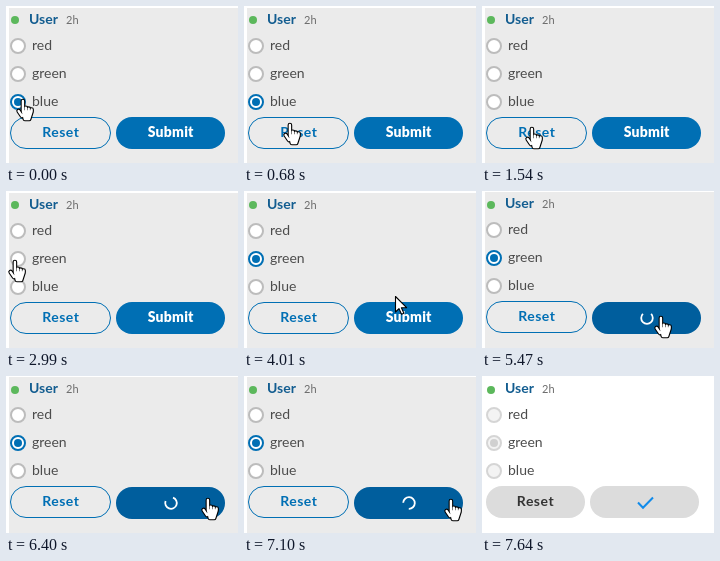
Animation of 232 by 157 pixels, one loop 8090 ms. Source, as an HTML page with a canvas:

```html
<!DOCTYPE html>
<html lang="en">
<head>
<meta charset="utf-8">
<title>Choice form</title>
<style>
  html, body { margin: 0; width: 100%; height: 100%; overflow: hidden; background: #fff; }
  canvas { display: block; width: 232px; height: 157px; }
</style>
</head>
<body>
<canvas id="stage"></canvas>
<script>
const W = 232, H = 157, LOOP = 8090;
const CLEAR = 1540, PICK = 3410, SEND = 4590, DONE = 7200, LEAVE = 7620;
const BLUE = '#006fb4', DARK_BLUE = '#005e9d';

const canvas = document.getElementById('stage');
const ctx = canvas.getContext('2d');
const ratio = window.devicePixelRatio || 1;
canvas.width = W * ratio;
canvas.height = H * ratio;

const options = ['red', 'green', 'blue'];
const optionY = i => 40 + 28 * i;

// Pointer moves; bend lifts the middle of the way
const home = { x: 17, y: 92 };
const moves = [
  { from: 190, to: 950, x: 50, y: 120, bend: 0 },
  { from: 2370, to: 2940, x: 10, y: 62, bend: 0 },
  { from: 2940, to: 3060, x: 8, y: 71, bend: 0 },
  { from: 3570, to: 4350, x: 184, y: 122, bend: 8 },
  { from: SEND, to: 5380, x: 179, y: 124, bend: 0 },
  { from: 5480, to: 6400, x: 202, y: 121, bend: 0 },
  { from: 6400, to: 7020, x: 207, y: 122, bend: 0 },
  { from: DONE, to: LEAVE, x: 214, y: 160, bend: 0 }
];

function pointerAt(t) {
  let { x, y } = home;
  for (const move of moves) {
    if (t < move.from) break;
    const u = Math.min(1, (t - move.from) / (move.to - move.from));
    const ease = 1 - (1 - u) ** 2;
    x += (move.x - x) * ease;
    y += (move.y - y) * ease - move.bend * Math.sin(Math.PI * u);
  }
  return [x, y];
}

// Centre lines of the hand: palm, thumb and four fingers
const hand = new Path2D('M7 13.5H15.6L13.2 21H8.8ZM2.6 13L6 18');
for (let i = 0; i < 4; i++) {
  const x = 6.9 + 2.9 * i;
  hand.moveTo(x, i ? 8.8 + .9 * i : 3);
  hand.lineTo(x, 13);
}
const arrow = new Path2D('M.5 .5V16L4 12.6L6.5 18.3L8.9 17.3L6.4 11.7H11.6Z');

function text(str, x, y, font, color, align = 'left', spacing = 0) {
  ctx.font = `${font} Lato, sans-serif`;
  ctx.letterSpacing = spacing + 'px';
  ctx.textAlign = align;
  ctx.fillStyle = color;
  ctx.fillText(str, x, y);
}

function outline(color, width, shape) {
  ctx.strokeStyle = color;
  ctx.lineWidth = width;
  if (shape) ctx.stroke(shape); else ctx.stroke();
}

function disc(x, y, r, fill, ring) {
  ctx.beginPath();
  ctx.arc(x, y, r, 0, 7);
  ctx.fillStyle = fill;
  ctx.fill();
  if (ring) outline(ring, 2);
}

function pill(x, y, w, h, fill, border) {
  ctx.beginPath();
  ctx.roundRect(x, y, w, h, h / 2);
  ctx.fillStyle = fill;
  ctx.fill();
  if (border) outline(border, 1);
}

function radio(y, selected, disabled) {
  const ring = disabled ? '#d5d5d5' : selected ? BLUE : '#bcbcbc';
  disc(12, y, 7, disabled ? '#f3f3f3' : '#fff', ring);
  if (selected) disc(12, y, 4, disabled ? '#d0d0d0' : BLUE);
}

function spinner(t) {
  const gap = -Math.PI / 2 + (t - 5470) / 1000 * Math.PI * 2;
  ctx.beginPath();
  ctx.arc(165, 127, 5.8, gap + Math.PI / 4, gap + Math.PI * 1.75);
  outline('#fff', 1.8);
}

function checkMark() {
  ctx.beginPath();
  ctx.moveTo(156, 126.5);
  ctx.lineTo(161, 131.8);
  ctx.lineTo(171, 121.5);
  outline('#118bea', 2);
}

function resetButton(top, done) {
  if (done) pill(4, top, 99, 32, '#dcdcdc');
  else pill(4.5, top + .5, 100, 31, 'transparent', BLUE);
  text('Reset', done ? 53.5 : 54.8, top + 20, 'bold 14px', done ? '#343434' : BLUE, 'center', .5);
}

function submitButton(t, hover) {
  if (t >= DONE) {
    pill(108, 110, 109, 32, '#dcdcdc');
    checkMark();
    return;
  }
  const sending = t >= SEND;
  pill(110, 111, 109, 32, sending || hover ? DARK_BLUE : BLUE);
  if (sending) spinner(t);
  else text('Submit', 164.7, 131, '900 14px', '#fff', 'center', .2);
}

function pointer(x, y, overControl) {
  ctx.save();
  ctx.lineCap = ctx.lineJoin = 'round';
  ctx.translate(Math.round(x), Math.round(y));
  ctx.fillStyle = '#fff';
  if (overControl) {
    ctx.translate(-7, 0);
    outline('#000', 4.6, hand);
    outline('#fff', 2.4, hand);
    ctx.fill(hand);
  } else {
    ctx.fill(arrow);
    outline('#000', 1.1, arrow);
  }
  ctx.restore();
}

function draw(t) {
  const done = t >= DONE, shift = t >= SEND ? -1 : 0;
  const choice = t < CLEAR ? 'blue' : t < PICK ? '' : 'green';
  const [px, py] = pointerAt(t);
  const inRow = py >= 111 && py <= 143;
  const onReset = inRow && px >= 4 && px <= 105;
  const onSubmit = inRow && px >= 110 && px <= 219;
  const onOption = px < 62 && options.some((_, i) => Math.abs(py - optionY(i)) < 9);

  ctx.setTransform(ratio, 0, 0, ratio, 0, 0);
  ctx.fillStyle = '#fff';
  ctx.fillRect(0, 0, W, H);
  if (t < LEAVE) {
    ctx.fillStyle = '#ebebeb';
    ctx.fillRect(3, 2 + shift, W, H);
  }

  disc(9, 14, 4, '#5cb85c');
  text('User', 23, 18 + shift, 'bold 14px', '#135d90');
  text('2h', 60, 18 + shift, '11px', '#6c6c6c');
  options.forEach((name, i) => {
    const y = optionY(i) + shift;
    radio(y, name === choice, done);
    text(name, 26, y + 4, '14px', '#4c4c4c');
  });
  resetButton(111 + shift, done);
  submitButton(t, onSubmit);
  if (t < LEAVE) pointer(px, py, !done && (onReset || onSubmit || onOption));
}

function tick() {
  draw(performance.now() % LOOP);
  requestAnimationFrame(tick);
}
tick();
</script>
</body>
</html>
```
